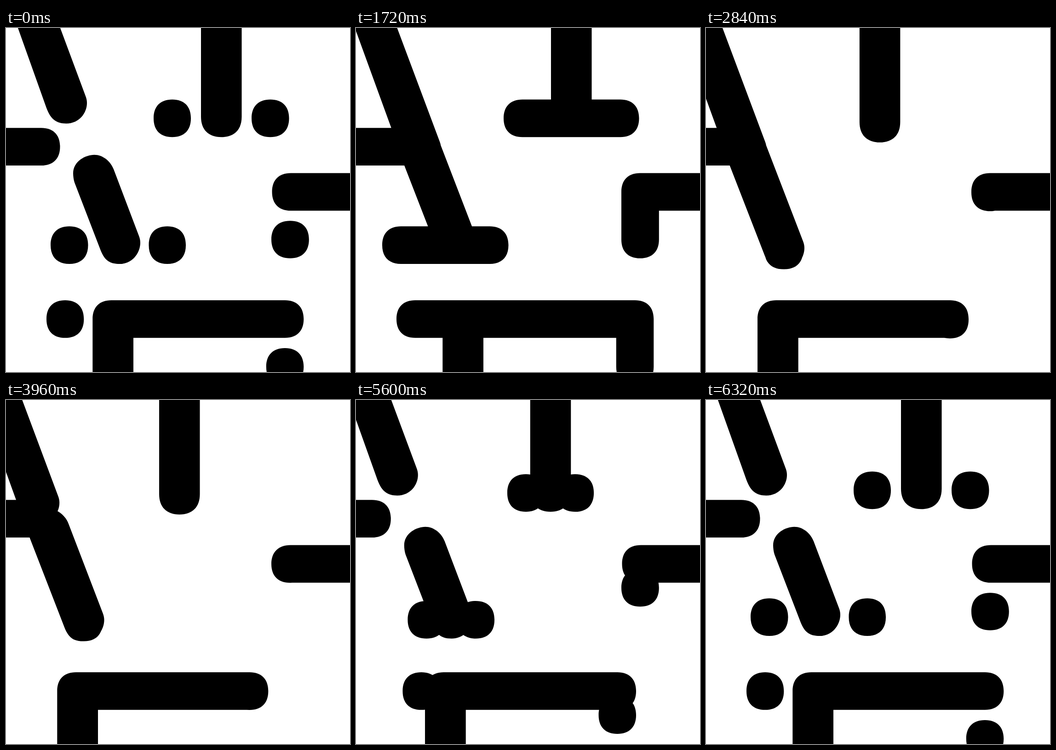
Animation of 748x748 px, one loop 6400 ms. Source, as an HTML page:

```html
<!DOCTYPE html>
<html lang="en">
<head>
<meta charset="utf-8">
<title>Stencil serif morph</title>
<style>
  html, body { margin: 0; width: 100%; height: 100%; overflow: hidden; background: #fff; }
  svg { display: block; width: 100vw; height: 100vh; }
</style>
</head>
<body>
<svg viewBox="0 0 748 748"><path id="ink" fill="#000"/></svg>
<script>
const LEG = 1600;
const SOFT = 0.635; // corner handle length, a little squarer than a circle
const R = 40.8;     // radius of horizontal strokes and dots
const STEM = 44.2;  // radius of vertical strokes
const ink = document.getElementById('ink');

// Corners of the design space: [gap, serif]
const stops = [[1, 1], [0, 1], [0, 0], [1, 0]];

const easeInOutQuint = t =>
  t < 0.5 ? 16 * t ** 5 : 1 - 16 * (1 - t) ** 5;

// Rounded box, radii in order: top left, top right, bottom right, bottom left
function box(x0, y0, x1, y1, radii = [R, R, R, R]) {
  const [a, b, c, d] = radii.map(r => Math.min(r, (x1 - x0) / 2, (y1 - y0) / 2));
  const h = r => r * (1 - SOFT);
  return `M${x0 + a} ${y0}H${x1 - b}` +
    `C${x1 - h(b)} ${y0} ${x1} ${y0 + h(b)} ${x1} ${y0 + b}V${y1 - c}` +
    `C${x1} ${y1 - h(c)} ${x1 - h(c)} ${y1} ${x1 - c} ${y1}H${x0 + d}` +
    `C${x0 + h(d)} ${y1} ${x0} ${y1 - h(d)} ${x0} ${y1 - d}V${y0 + a}` +
    `C${x0} ${y0 + h(a)} ${x0 + h(a)} ${y0} ${x0 + a} ${y0}Z`;
}

// Moves a list of x,y pairs by one offset
const shift = (points, dx, dy) =>
  points.map((v, i) => v + (i % 2 ? dy : dx)).join(' ');

function outline(gap, serif) {
  // Values at: stencil serif, joined serif, joined sans, stencil sans
  const mix = (a, b, c, d) =>
    serif * (gap * a + (1 - gap) * b) + (1 - serif) * (gap * d + (1 - gap) * c);
  const sans = 1 - serif;
  const reach = 103.5 * serif * (1 - gap);

  // Top stem with its feet
  const stemX = 424 - 91 * sans;
  const footY = 155.5 + 11.6 * sans;
  const footL = 321 + 16 * sans;
  const footR = 615.5 - 198 * sans;
  const top = box(stemX, -100, stemX + 88.5, footY + 81.8, [0, 0, STEM, STEM]) +
    box(footL, footY, footL + 81 + reach, footY + 81.8) +
    box(footR - 81.5 - reach, footY, footR, footY + 81.8);

  // Upper diagonal
  const headX = mix(0, -28.5, -82.5, -83);
  const capX = mix(0, 9, -45, -83);
  const capY = mix(0, 99, 99, 0);
  const upper = `M${shift([18.8, -20, 110.5, -20], headX, 0)}L` +
    shift([173, 148], capX, capY) + 'C' +
    shift([175, 153, 176, 158, 176, 163, 176, 184, 160, 207.7, 131, 207.7,
      109, 207.7, 97, 198, 88, 174], capX, capY) + 'Z';

  // Lower diagonal
  const neckX = mix(0, -54, -108, -83);
  const neckY = mix(0, -63, -63, 0);
  const baseX = mix(0, -29, -78.5, -78.5);
  const baseY = 11.6 * sans;
  const lower = `M${shift([149, 336], neckX, neckY)}C` +
    shift([147, 330, 146, 322, 146, 316, 146, 290, 173, 275.8, 192, 275.8,
      210, 275.8, 227, 289, 234, 307], neckX, neckY) + 'L' +
    shift([289, 452], baseX, baseY) + 'C' +
    shift([291, 457, 292, 462, 292, 467, 292, 488, 276, 513, 247, 513,
      226, 513, 215, 506, 206, 484], baseX, baseY) + 'Z';

  // Feet of the diagonal and the crossbar on its left
  const toeY = 431.2 + 11.6 * sans;
  const feet =
    box(mix(97, 57, 128, 128), toeY, mix(178.5, 246, 210, 210), toeY + 81.8) +
    box(mix(310.5, 173, 128, 128), toeY, mix(391, 331.5, 210, 210), toeY + 81.8);
  const bar = box(-120, 217.2, mix(117.5, 180.5, 126.5, 33.5), 299);

  // Right arm and its tail
  const tailY = 500.7 - 103.3 * sans;
  const arm = box(577 + 1.5 * gap, 315.5, 860, 397.2) +
    box(577, tailY - 81.5 - reach, 658.8, tailY);

  // Bottom bar, stem, left dot and right tail
  const slide = -77 * sans;
  const dotL = 88 + 27 * sans;
  const dropY = 777.5 - 103.5 * sans;
  const base = box(188.3 + slide, 592, 647.3 + slide, 673.8, [STEM, R, R, 0]) +
    box(188.3 + slide, 630, 277 + slide, 860, [0, 0, 0, 0]) +
    box(dotL, 592, dotL + 81.3 + reach, 673.8) +
    box(565.8 + slide, dropY - 81.5 - reach, 647.3 + slide, dropY);

  return top + upper + lower + feet + bar + arm + base;
}

function draw(now) {
  const turn = (now / LEG) % stops.length;
  const leg = Math.floor(turn);
  const e = easeInOutQuint(turn - leg);
  const from = stops[leg];
  const to = stops[(leg + 1) % stops.length];
  ink.setAttribute('d', outline(...from.map((v, i) => v + (to[i] - v) * e)));
}

const start = performance.now();
function tick() {
  draw(performance.now() - start);
  requestAnimationFrame(tick);
}
tick();
</script>
</body>
</html>
```
